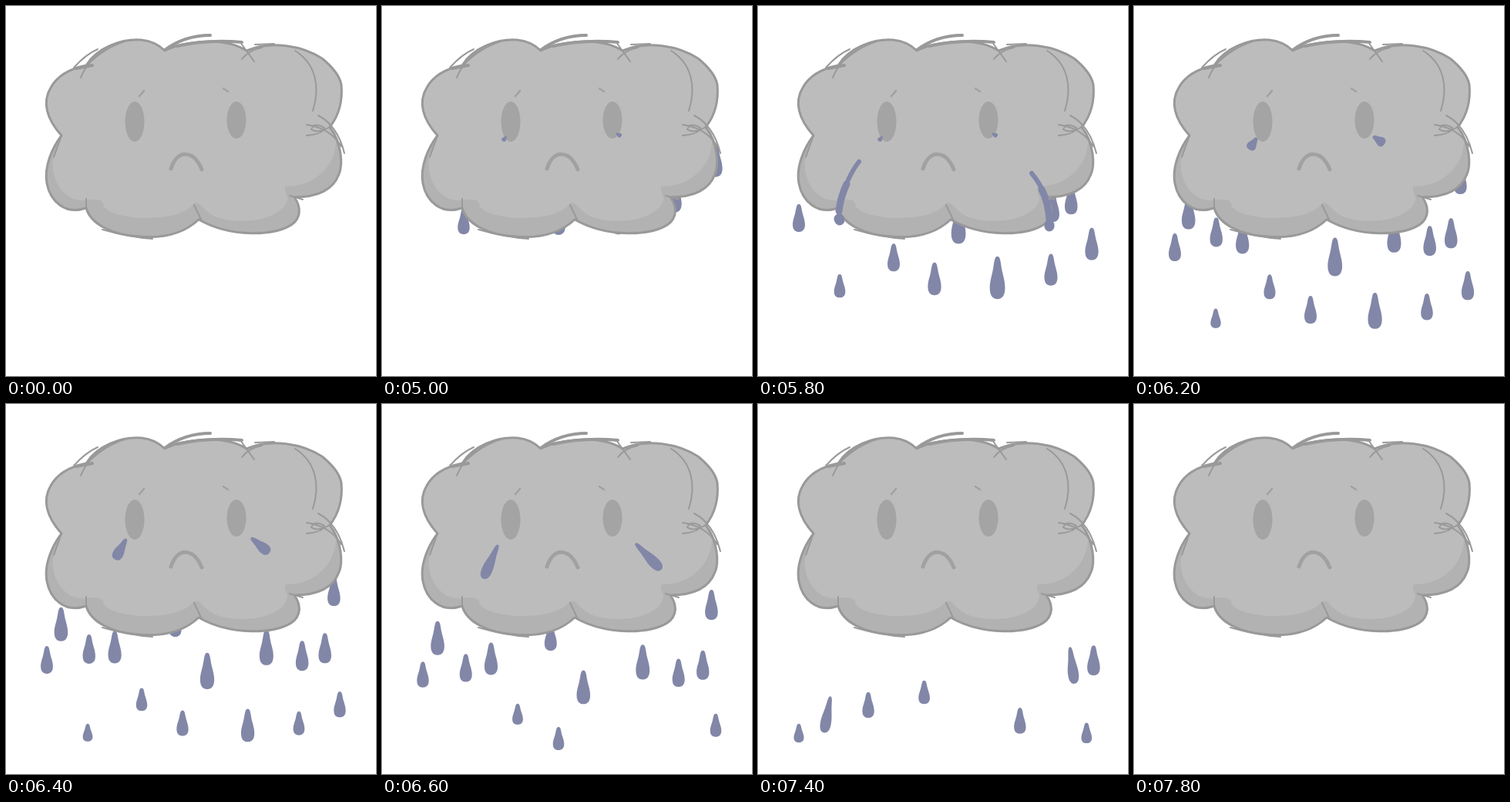
An HTML page for the animation above (8000 ms loop, 480 by 480 pixels).

```html
<!DOCTYPE html>
<html lang="en">
<head>
<meta charset="utf-8">
<title>Sad rain cloud</title>
<style>
  html, body { margin: 0; height: 100%; overflow: hidden; background: #fff; }
  svg { display: block; width: 100vw; height: 100vh; }
  .line { fill: none; stroke: #999; stroke-linecap: round; stroke-linejoin: round; }
  .rain { fill: #8287a8; }
  #streams { fill: none; stroke: #8287a8; stroke-linecap: round; visibility: hidden; }
</style>
</head>
<body>
<svg viewBox="0 0 480 480">
  <defs>
    <path id="outline" d="M72 168C52 146 47 124 58 106Q70 84 104 77C118 54 150 42 176 44Q194 46 206 58C226 47 280 38 312 58C345 44 385 52 410 68Q432 86 435 102C437 125 432 142 420 157C436 178 437 206 432 218C424 240 402 248 374 248C384 262 382 276 370 284C348 298 292 301 250 277C232 294 205 302 172 299C140 297 110 284 104 262C76 272 57 252 53 230C49 208 60 184 72 168Z"/>
    <clipPath id="cloud"><use href="#outline"/></clipPath>
  </defs>

  <g id="behind" class="rain"></g>

  <g clip-path="url(#cloud)">
    <rect width="480" height="480" fill="#b2b2b2"/>
    <path fill="#bcbcbc" d="M0 0H480V178H428C426 205 405 232 367 234C360 232 361 240 365 248C366 262 345 279 305 279C280 278 268 274 256 262Q247 250 240 260C225 274 195 275 175 275C150 273 132 268 127 260C127 250 116 250 106 252C75 256 58 225 61 200L70 170H0Z"/>
  </g>

  <use href="#outline" class="line" stroke-width="3"/>
  <g class="line" stroke-width="2">
    <path d="M88 80Q103 63 119 56M97 93Q106 70 132 53M106 76Q128 54 154 46"/>
    <path stroke-width="4" d="M91 81L112 77M206 57Q232 38 265 38M222 52Q262 43 306 47"/>
    <path d="M306 69Q315 57 332 54M304 47L322 72M323 50L348 49"/>
    <path d="M375 58C402 75 408 105 398 136"/>
    <path d="M390 168Q412 166 413 158Q400 150 396 160Q404 166 420 157M405 142Q430 155 439 191M390 154Q420 158 435 182"/>
    <path d="M72 168L62 196M125 290Q160 300 190 302M368 246L385 251M104 250V262M244 258L254 279"/>
  </g>

  <g fill="#a4a4a4">
    <ellipse cx="167" cy="150" rx="12.5" ry="26"/>
    <ellipse cx="299" cy="148" rx="12.5" ry="24"/>
  </g>
  <g class="line" style="stroke: #a1a1a1">
    <path stroke-width="2.5" d="M173 117L179 110M282 107L288 111"/>
    <path stroke-width="5" d="M214 211C222 186 243 186 254 212"/>
  </g>

  <g id="streams">
    <path stroke-width="6" d="M131 202C119 217 108 243 105 268M355 217C369 234 377 252 378 274"/>
    <path stroke-width="9" d="M115 231Q107 248 105 266M368 238Q377 256 378 278"/>
    <path stroke-width="13" d="M105 276L106 278M378 284V286"/>
  </g>
  <g id="front" class="rain"></g>
</svg>

<script>
const LOOP = 8000, RAIN_START = 5000, STEP = 200, LAST_STEP = 13;
const CLOUD_BASE = 275, TOP = 200, GROUND = 436;
const STREAM_STEP = 4;
const DROP = 'M0-.5C.22-.5 .2-.34 .32-.14C.44 .04 .5 .12 .5 .24C.5 .42 .3 .5 0 .5C-.3 .5-.5 .42-.5 .24C-.5 .12-.44 .04-.32-.14C-.2-.34-.22-.5 0-.5Z';
const [behind, front, streams] = ['behind', 'front', 'streams'].map(id => document.getElementById(id));

const shape = (x, y, w, h, angle = 0) =>
  `<path d="${DROP}" transform="translate(${x} ${y}) rotate(${angle}) scale(${w} ${h})"/>`;

// A drop passes the cloud base at step `birth`, falls evenly and shrinks near the ground.
function drop(x, birth, speed, size, drift = 0, last = LAST_STEP) {
  return step => {
    const age = step - birth;
    const y = CLOUD_BASE + speed * age;
    if (y < TOP || y > GROUND || step > last) return '';
    const h = size * Math.min(1, 1 - (y - 330) / 300);
    return shape(x + drift * age, y, 2.65 * Math.sqrt(h), h);
  };
}

// A tear leaves the eye slowly, speeds up along a parabola and stretches.
function tear(start, last, rate, [x, y], [vx, vy], [ax, ay]) {
  return step => {
    if (step < start || step > last) return '';
    const p = ((step - start) * rate) ** 2;
    const cy = y + vy * p + ay * p * p;
    if (cy > GROUND) return '';
    const angle = -Math.atan2(vx + 2 * ax * p, vy + 2 * ay * p) * 180 / Math.PI;
    return shape(x + vx * p + ax * p * p, cy, Math.min(14, 6 + 70 * p), Math.min(48, 8 + 110 * p), angle);
  };
}

const leftTear = (...timing) => tear(...timing, [159, 172], [-50, 66], [2, 62]);
const rightTear = (...timing) => tear(...timing, [307, 167], [117, 73], [-33, 30]);

const rain = [
  drop(53, 4, 19, 36),
  drop(106, -.2, 21, 34),
  drop(229, .05, 20, 46),
  drop(307, .4, 21.5, 60, 1),
  drop(380, 1.2, 24, 43),
  drop(433, 2.75, 27, 42),
  drop(176, 1.3, 19, 36),
  drop(260, 3.6, 21, 50, .3),
  drop(409, 5.1, 22, 39, 2.5),
  drop(71, 6.4, 18, 44, .7, 9),
  drop(106, 5.25, 24.5, 38, 1),
  drop(140, 4.3, 15, 42, .4),
  drop(337, 4.85, 19, 46, .4),
  drop(383, 4.65, 22, 39, .5),
  drop(429, 8.8, 18, 39, 2),
  drop(220, 6.5, 18, 36, -.8)
];

const tears = [
  leftTear(0, STREAM_STEP - 1, 1 / 5),
  rightTear(0, STREAM_STEP - 1, 1 / 5),
  leftTear(STREAM_STEP, LAST_STEP, 1 / 6.6),
  rightTear(STREAM_STEP, LAST_STEP, 1 / 6.6)
];

const render = (parts, step) => parts.map(part => part(step)).join('');
let shown = null;

function frame(now) {
  const step = Math.floor((now % LOOP - RAIN_START) / STEP);
  if (step !== shown) {
    shown = step;
    const raining = step >= 0 && step <= LAST_STEP;
    behind.innerHTML = raining ? render(rain, step) : '';
    front.innerHTML = raining ? render(tears, step) : '';
    streams.style.visibility = step === STREAM_STEP ? 'visible' : 'hidden';
  }
  requestAnimationFrame(() => frame(performance.now()));
}
frame(performance.now());
</script>
</body>
</html>
```
